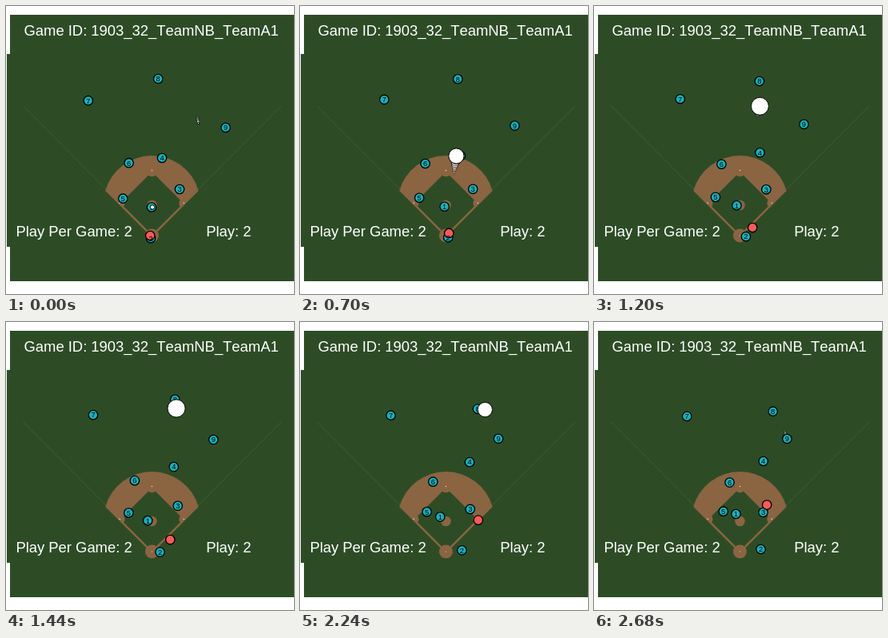
Recreate the animation shown at these times as an HTML page. Size 360 by 360 pixels, loop 2.7 s.

```html
<!DOCTYPE html>
<html lang="en">
<head>
<meta charset="utf-8">
<title>Play view</title>
<style>
  html, body { margin: 0; width: 100%; height: 100%; overflow: hidden; background: #fff; }
  svg { display: block; width: 100vw; height: 100vh; }
  text { font-family: "Liberation Sans", Arial, sans-serif; font-kerning: none; }
  .title { font-size: 18.42px; fill: #fff; }
  .num { font-size: 9.3px; text-anchor: middle; fill: #000; }
  .dot { stroke: #000; stroke-width: 1.3; }
  .ball { fill: #fff; stroke: #000; stroke-width: 1; }
</style>
</head>
<body>
<svg viewBox="0 0 360 360">
  <path d="M5 11H360V344H5V301H1V60H5Z" fill="#2d4c26"/>
  <path d="M21.5 125L182.5 287L344 125" fill="none" stroke="#fff" stroke-opacity=".13" stroke-width=".7"/>
  <g fill="#8b6442">
    <path d="M124.2 231A60.5 60.5 0 0 1 240.6 231L182.4 289.2Z"/>
    <path d="M182.4 207.2l39.3 39.3l-39.3 39.3l-39.3 -39.3Z" fill="#2d4c26"/>
    <circle cx="182.4" cy="207" r="6.3"/>
    <path d="M222.5 246.5l-4.4 4.4a6.3 6.3 0 0 1 0 -8.8Z"/>
    <path d="M142.3 246.5l4.4 4.4a6.3 6.3 0 0 0 0 -8.8Z"/>
    <circle cx="182.4" cy="249" r="6.3"/>
    <circle cx="182.4" cy="287" r="8.5"/>
  </g>
  <g fill="#fff" fill-opacity=".8">
    <circle cx="182.4" cy="205.5" r=".8"/>
    <circle cx="222.3" cy="246.2" r=".8"/>
    <circle cx="142.2" cy="246.2" r=".8"/>
    <circle cx="182.4" cy="287" r=".6"/>
  </g>
  <g class="title">
    <text x="22.5" y="37">Game ID: 1903_32_TeamNB_TeamA1</text>
    <text x="12.4" y="288">Play Per Game: 2</text>
    <text x="250.2" y="288">Play: 2</text>
  </g>
  <g id="wake"></g>
  <g id="dots"></g>
  <g id="nums"></g>
  <circle id="ball" class="ball"/>
</svg>
<script>
const LOOP = 2700, STEP = 20, HIT = 200, LAND = 2660, WAKE = 7;
const CYAN = "#14b2bd", RED = "#fa5a5a";

const $ = id => document.getElementById(id);

function set(el, attrs) {
  for (const k in attrs) el.setAttribute(k, attrs[k]);
}

function add(parent, tag, attrs) {
  const el = document.createElementNS("http://www.w3.org/2000/svg", tag);
  set(el, attrs);
  return parent.appendChild(el);
}

const power = n => s => s ** n;
const drift = power(1.25), jog = power(1.4), step = power(2), sprint = power(2.2);
const chase = s => s * s * (3 - 2 * s);

const bezier = (a, b, c, p) => a * (1 - p) ** 2 + 2 * b * p * (1 - p) + c * p * p;

// Each player runs along one bent path at an eased pace
function player(label, ease, from, bend, to, fill = CYAN) {
  const dot = add($("dots"), "circle", { class: "dot", r: 5.7, fill });
  const num = add($("nums"), "text", { class: "num" });
  num.textContent = label;
  return s => {
    const [x, y] = [0, 1].map(i => bezier(from[i], bend[i], to[i], ease(s)));
    set(dot, { cx: x, cy: y });
    set(num, { x, y: y + 3.3 });
  };
}

const players = [
  player("1", step, [182, 251.5], [171.3, 246], [177.4, 240]),
  player("2", jog, [181, 290.3], [194.7, 287], [208.5, 284]),
  player("3", jog, [217, 229], [214.3, 227.5], [211.5, 238]),
  player("4", chase, [195, 190], [214.4, 182], [211.7, 174]),
  player("5", drift, [146.2, 240.7], [154, 238], [161.7, 236.7]),
  player("6", drift, [153.6, 196.2], [161.5, 198.3], [169.5, 200.6]),
  player("7", drift, [102.8, 118.2], [109.5, 114.2], [116.2, 117.9]),
  player("8", chase, [190.2, 91], [212, 89.7], [223.7, 111.7]),
  player("9", drift, [274.6, 152], [258, 144.7], [241.3, 146]),
  player("", sprint, [180.2, 287], [240, 257.8], [216.1, 228.6], RED)
];

// A straight pitch, then a fly ball that grows with its height
function ballAt(t) {
  if (t < HIT) {
    const p = t / HIT;
    return { cx: 183, cy: 251.5 + 34 * p, r: 2.7 - p };
  }
  const p = Math.min(1, (t - HIT) / (LAND - HIT));
  return {
    cx: bezier(183.1, 213.7, 240.6, p),
    cy: bezier(285.2, 1.2, 146.7, p),
    r: 1.6 + 9.5 * (4 * p * (1 - p)) ** 0.4
  };
}

const ghosts = Array.from({ length: WAKE }, (_, i) => {
  const age = WAKE - i, fade = 1 - age / (WAKE + 1);
  return { age, fade, el: add($("wake"), "circle", { class: "ball", opacity: fade }) };
});

function draw(t) {
  for (const move of players) move(t / (LOOP - STEP));
  for (const { age, fade, el } of ghosts) {
    const b = ballAt((t - age * STEP + LOOP) % LOOP);
    set(el, { ...b, r: b.r * fade * 0.8, "stroke-width": fade });
  }
  set($("ball"), { ...ballAt(t), visibility: t < LAND ? "visible" : "hidden" });
}

const start = performance.now();
function tick() {
  const t = (performance.now() - start) % LOOP;
  draw(Math.floor(t / STEP) * STEP);
  requestAnimationFrame(tick);
}
tick();
</script>
</body>
</html>
```
